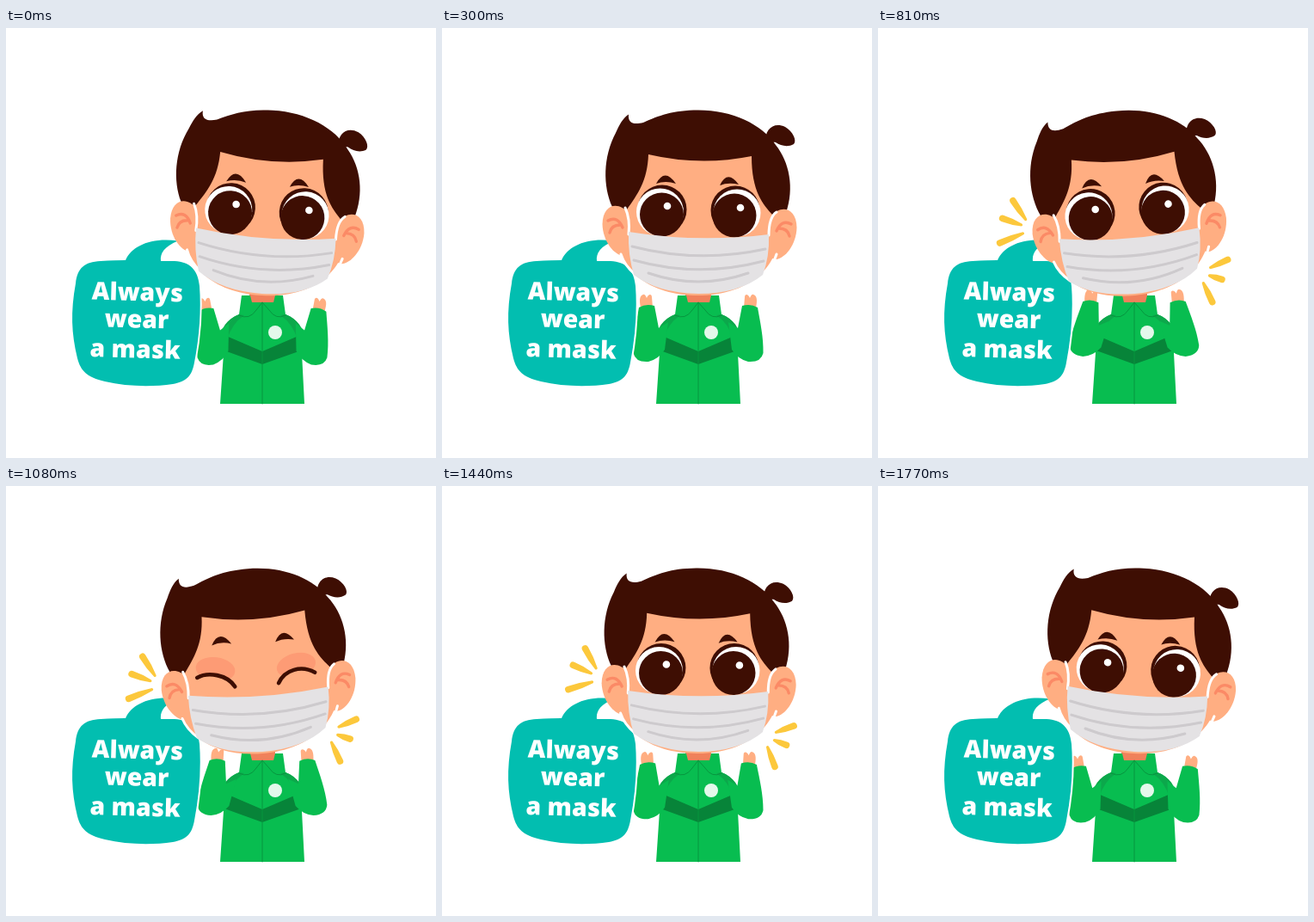
An HTML page that plays this animation: 500 by 500 pixels, repeating every 1.8 s.

```html
<!DOCTYPE html>
<html lang="en">
<head>
<meta charset="utf-8">
<title>Always wear a mask</title>
<style>
  html, body { margin: 0; width: 100%; height: 100%; overflow: hidden; background: #fff; }
  svg { display: block; width: 100vw; height: 100vh; }
  text { font: 800 28.5px "Open Sans", "Noto Sans", sans-serif; fill: #fff; text-anchor: middle; }
  .line { fill: none; stroke-linecap: round; stroke-linejoin: round; }
  .skin { fill: #ffae82; }
  .hair { fill: #3e0e03; }
  .strap { stroke: #fff; stroke-width: 3; }
  .fold { stroke: #cdcacd; stroke-width: 3; }
  .inner-ear { stroke: #fb8a66; stroke-width: 3.4; }
  .seam { stroke: #07963f; stroke-width: 1; }
  .lid { stroke: #3e0e03; stroke-width: 4.6; }
</style>
</head>
<body>
<svg viewBox="0 0 500 500">
  <defs>
    <g id="arm">
      <path class="skin" d="M231 325 C229 316 230 311 234 310 C236 309 237 312 238 314 C240 309 244 309 244 313 L245 325Z"/>
      <path fill="#08bd50" d="M229 325 Q237 320 247 323 L252 349 L263 342 L259 374 Q252 385 240 388 Q225 389 222.500 378 C222 360 226 342 229 325Z"/>
    </g>
    <g id="ear">
      <path class="skin" d="M217 216 C206 201 187 204 186.500 228 C187 248 200 264 211 265 L222 262Z"/>
      <path class="line inner-ear" d="M193 224 Q204 218 210 232 M195 238 Q197 229 207 229"/>
    </g>
  </defs>

  <g id="body">
    <path fill="#f0815b" d="M283 300 H313 V324 H283Z"/>
    <path fill="#08bd50" d="M274 311 L284 311 L286 319 H311 L313 311 L322 311 L325 333 C341 339 347 352 344 378 L347 437 H249 L253 378 C249 352 256 339 271 333Z"/>
    <path fill="#0ca84b" d="M271 333 C257 338 249 350 250 361 L257 363 Q262 344 277 334Z M325 333 C339 338 347 350 346 361 L339 363 Q334 344 319 334Z"/>
    <path fill="#078439" d="M256 358 L298 376 L340 358 L346 374 L298 391 L251 374Z"/>
    <path class="line seam" d="M298 319 V437 M271 334 Q283 340 291 328 L298 319 L306 328 Q314 340 325 334"/>
    <circle cx="313" cy="354" r="8" fill="#e4f8eb"/>
    <use id="armLeft" href="#arm"/>
    <g transform="translate(596 0) scale(-1 1)"><use id="armRight" href="#arm"/></g>
  </g>

  <g id="bubble">
    <path fill="#02beb0" stroke="#fff" stroke-width="4" paint-order="stroke" d="M81 297 C83 279 91 272 110 271 Q128 270 139 270 C146 254 168 243 200 247.500 C184 254 179 262 180 271 L196 271 C214 272 223 281 225 300 C227 328 225 358 219 389 C216 406 209 411 194 414 C170 417.500 140 417 115 411 C94 406 87 399 83 384 C76 355 75 330 81 297Z"/>
    <g transform="rotate(1.500 152 340)">
      <text x="152" y="317">Always</text>
      <text x="152" y="348.500">wear</text>
      <text x="151" y="383.500">a mask</text>
    </g>
  </g>

  <g id="head">
    <g id="sparksLeft"></g>
    <g id="sparksRight"></g>
    <path class="hair" d="M376 134 C375 117 386 109 399 115 C408 120 413 131 409 135 C402 139 394 137 388 133 C382 132 380 136 377 142Z"/>
    <path class="skin" d="M224 138 H376 L393 225 C396 280 354 311 298 311 C242 311 201 282 204 232Z"/>
    <path class="hair" d="M217 100.500 C216 110 222 113 234 110 C252 102 268 95.500 298 95.500 C338 95.500 372 112 388 136 C404 156 410 186 400 215 L385 218 C373 205 360 190 360 149 Q300 161 240 147 C239 178 227 194 215 211 L198 208 C187 184 187 150 202 122 C206 113 210 105 217 100.500Z"/>
    <use href="#ear"/>
    <use href="#ear" transform="translate(599 4) scale(-1 1)"/>

    <g class="hair">
      <path d="M249 181 Q259 162 272 181 Q260 177 249 181Z"/>
      <path d="M323 183 Q332 164 345 182 Q333 179 323 183Z"/>
    </g>
    <g id="openEyes">
      <g class="hair">
        <circle cx="256" cy="211" r="28.500"/>
        <circle cx="341" cy="212" r="28.500"/>
      </g>
      <g fill="#fff">
        <circle cx="253.500" cy="214" r="27.500"/>
        <circle cx="343" cy="215" r="27.500"/>
      </g>
      <g class="hair">
        <circle cx="255.500" cy="217" r="25.500"/>
        <circle cx="340" cy="218" r="25.500"/>
      </g>
      <g fill="#fff">
        <circle cx="262" cy="207" r="4.300"/>
        <circle cx="347" cy="209" r="4.300"/>
      </g>
    </g>
    <g id="closedEyes">
      <ellipse cx="251" cy="209" rx="23" ry="14" fill="#fd9b75" transform="rotate(12 251 209)"/>
      <ellipse cx="345" cy="212" rx="23" ry="14" fill="#fd9b75" transform="rotate(-9 345 212)"/>
      <path class="skin" d="M228 217 C240 208 265 215 272 231 L250 240 L226 232Z M323 231 C331 215 350 210 367 222 L370 236 L340 242Z"/>
      <path class="line lid" d="M229 217 C242 211 264 216 272 231 M323 231 C331 216 351 212 366 222"/>
    </g>

    <path class="line strap" d="M213 209 Q219 222 217 240 M208 263 Q212 276 225 287 M389 214 Q380 220 380 241 M389 263 Q385 277 373 287"/>
    <path fill="#e4e2e4" d="M217 237 Q298 250 380 240 Q381 266 373 287 Q346 309 298 309 Q250 308 223 287 Q216 263 217 237Z"/>
    <path class="line fold" d="M221 254 Q298 274 376 257 M223 270 Q298 291 374 271 M240 285 Q298 305 356 285"/>
  </g>
</svg>
<script>
const LOOP = 1800, STEP = 30;
const $ = id => document.getElementById(id);
const clamp01 = v => Math.min(1, Math.max(0, v));
const progress = (t, from, to) => clamp01((t - from) / (to - from));

// A petal, narrow at its inner end and rounded at its outer end.
function spark(x1, y1, x2, y2) {
  const r = 3.8, length = Math.hypot(x2 - x1, y2 - y1) - r;
  const angle = Math.atan2(y2 - y1, x2 - x1) * 180 / Math.PI;
  return `<path fill="#fcc83c" transform="translate(${x1} ${y1}) rotate(${angle})"
    d="M1 -1.500 Q${length / 2} -4 ${length} ${-r} A${r} ${r} 0 0 1 ${length} ${r} Q${length / 2} 4 1 1.500 Q-1 0 1 -1.500Z"/>`;
}

$("sparksLeft").innerHTML =
  spark(181, 212, 166, 184) + spark(176, 217, 150, 205) + spark(177, 226, 144, 236);
$("sparksRight").innerHTML =
  spark(387, 288, 413, 279) + spark(385, 296, 404, 304) + spark(378, 303, 388, 331);

function backOut(p) {
  const q = p - 1;
  return 1 + 2.8 * q ** 3 + 1.8 * q ** 2;
}

function scaleAround(el, x, y, s) {
  el.setAttribute("transform", `translate(${x} ${y}) scale(${s}) translate(${-x} ${-y})`);
  el.style.display = s > 0.01 ? "" : "none";
}

function render(time) {
  const t = Math.floor((time % LOOP) / STEP) * STEP;
  const sway = 1 - Math.abs(t / (LOOP / 2) - 1);
  const offset = sway - 1 / 3;

  $("head").setAttribute("transform", `rotate(${-10 * offset} 298 303)`);
  const armPose = `translate(0 ${-11 * offset}) rotate(${17.6 * offset} 238 378)`;
  $("armLeft").setAttribute("transform", armPose);
  $("armRight").setAttribute("transform", armPose);

  const closed = t >= 900 && t < 1290;
  $("openEyes").style.display = closed ? "none" : "";
  $("closedEyes").style.display = closed ? "" : "none";

  const size = t < 1200 ? backOut(progress(t, 570, 750)) : 1 - progress(t, 1530, 1650);
  scaleAround($("sparksLeft"), 186, 222, size);
  scaleAround($("sparksRight"), 375, 290, size);
}

const start = performance.now();
function tick() {
  render(performance.now() - start);
  requestAnimationFrame(tick);
}
tick();
</script>
</body>
</html>
```
